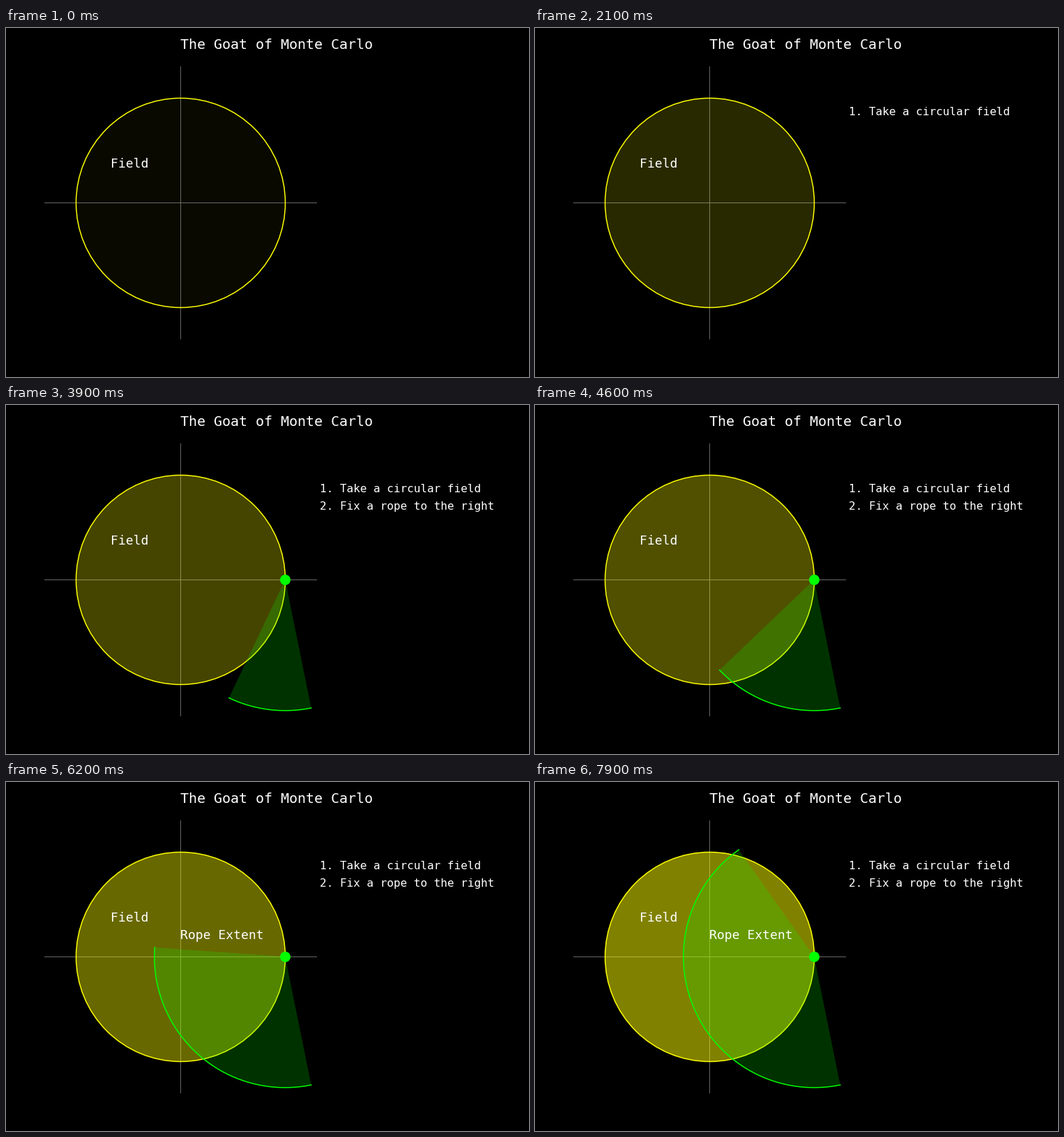
A matplotlib script that plays this animation: 750 by 500 pixels, repeating every 8 s.

```python
import numpy as np
import matplotlib.pyplot as plt
from matplotlib.animation import FuncAnimation
from matplotlib.patches import Circle

W, H, DPI = 750, 500, 100
FRAMES, STEP = 80, 100
PX = 72 / DPI  # points per pixel

CENTER, FIELD_R = 250.5, 150
PEG = (400.3, 250.3)
ROPE_R = 187.5
ARC_START, ARC_SPEED, ARC_BEGIN = 78.5, 2.985, 26.63  # degrees, degrees/frame, frame
YELLOW, GREEN = "#ffff00", "#00ff00"

plt.rcParams["font.family"] = "DejaVu Sans Mono"
fig = plt.figure(figsize=(W / DPI, H / DPI), dpi=DPI, facecolor="black")
ax = fig.add_axes([0, 0, 1, 1])
ax.set_xlim(0, W)
ax.set_ylim(H, 0)
ax.axis("off")


def label(x, y, text, size):
    return ax.text(x, y, text, size=size * PX, color="white",
                   ha="left", va="baseline", zorder=8)


# Axes and field
for xs, ys in (([55, 446], [CENTER] * 2), ([CENTER] * 2, [55, 446])):
    ax.plot(xs, ys, color="0.4", lw=PX, solid_capstyle="butt", snap=False, zorder=1)
field = ax.add_patch(Circle((CENTER, CENTER), FIELD_R, fc=YELLOW, ec="none", zorder=2))
ax.add_patch(Circle((CENTER, CENTER), FIELD_R, fill=False, ec=YELLOW,
                    lw=1.5 * PX, zorder=3))

# Rope
sector, = ax.fill([0], [0], fc=GREEN, ec="none", alpha=0.2, zorder=4)
arc, = ax.plot([], [], color=GREEN, lw=1.5 * PX, zorder=5)
peg = ax.add_patch(Circle((400.5, 250.5), 7.5, fc=GREEN, ec="none", zorder=6))

# Text
label(250, 30, "The Goat of Monte Carlo", 20)
label(150, 200, "Field", 18)
timed = [
    (label(450, 125, "1. Take a circular field", 16), 10),
    (label(450, 150, "2. Fix a rope to the right", 16), 26),
    (label(250, 225, "Rope Extent", 18), 60),
    (peg, 26),
]


def update(n):
    field.set_alpha(min(0.04 + 0.006 * n, 0.51))
    for artist, begin in timed:
        artist.set_visible(n >= begin)

    sweep = ARC_SPEED * (n - ARC_BEGIN)
    sector.set_visible(sweep > 0)
    arc.set_visible(sweep > 0)
    if sweep > 0:
        t = np.radians(np.linspace(ARC_START, ARC_START + sweep, 120))
        x = PEG[0] + ROPE_R * np.cos(t)
        y = PEG[1] + ROPE_R * np.sin(t)
        arc.set_data(x, y)
        sector.set_xy(np.vstack([PEG, np.column_stack([x, y])]))
    return [field, sector, arc] + [artist for artist, _ in timed]


anim = FuncAnimation(fig, update, frames=FRAMES, interval=STEP,
                     init_func=lambda: update(0), repeat=True, repeat_delay=0)
plt.show()
```
